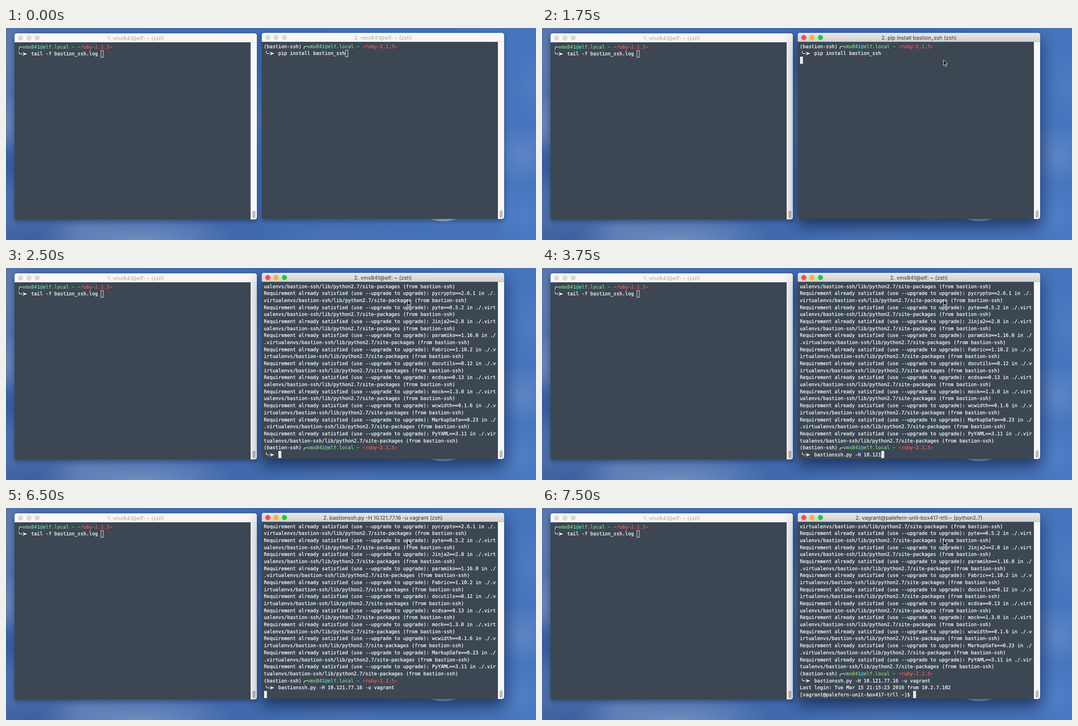
Write an HTML page with a canvas that moves like this. It is 1181 px wide and 474 px high and loops after 8 s.

```html
<!DOCTYPE html>
<html lang="en">
<head>
<meta charset="utf-8">
<title>Two terminals</title>
<style>
html, body { margin: 0; width: 1181px; height: 474px; overflow: hidden; }
body { position: relative; background: #4770b3; text-rendering: geometricPrecision; }
canvas, svg { position: absolute; left: 0; top: 0; }
.row {
  position: absolute; white-space: pre; color: #f6f7f6;
  font: 10.742px/15.68px "DejaVu Sans Mono", monospace;
  -webkit-text-stroke: .32px currentColor;
}
.title {
  position: absolute; width: 540px; text-align: center; white-space: pre;
  font: 11.8px/22px Inter, sans-serif; color: #a9a9a9;
}
.title.on { color: #353535; }
.g { color: #84cc84; }
.c { color: #14d0de; }
.r { color: #ff5a50; }
</style>
</head>
<body>
<canvas id="stage" width="1181" height="474"></canvas>
<div id="text"></div>
<svg width="1181" height="474">
  <path id="pointer" d="M.6 .8V13.4L3.5 10.8L5.6 15.4L7.7 14.5L5.7 10H9.5Z"
    fill="#080808" stroke="#fff" stroke-width="1"/>
</svg>
<script>
const LOOP = 8000, CELL = 6.467, ROW = 15.68, ROWS = 25, COLS = 80;
const ctx = document.getElementById('stage').getContext('2d');
const textLayer = document.getElementById('text');
const pointer = document.getElementById('pointer');

const USER = 'vmx841', HOST = 'elf', REMOTE = 'palefern-unit-box417-trll';
const left = { x: 19, y: 12, tx: 23.8 };
const right = { x: 570, y: 11, tx: 574.5 };

// Terminal content
const who = `<span class="g">${USER}</span><span class="c">@</span>` +
  `<span class="g">${HOST}.local</span> <span class="c">~</span> <span class="r">‹ruby-2.1.5›</span>`;
const head = { html: '(bastion-ssh)  ' + who, hook: 13 };
const entry = cmd => ({ html: '     ' + cmd, arrow: true });
const plain = html => ({ html });

const install = 'pip install bastion_ssh';
const connect = 'bastionssh.py -H 10.121.77.16 -u vagrant';
const packages = ('six==1.10.0 pycrypto==2.6.1 pyte==0.5.2 Jinja2==2.8 paramiko==1.16.0 ' +
  'Fabric==1.10.2 docutils==0.12 ecdsa==0.13 mock==1.3.0 wcwidth==0.1.6 ' +
  'MarkupSafe==0.23 PyYAML==3.11').split(' ');
const output = packages.flatMap(p => {
  const s = `Requirement already satisfied (use --upgrade to upgrade): ${p} in ` +
    './.virtualenvs/bastion-ssh/lib/python2.7/site-packages (from bastion-ssh)';
  return [plain(s.slice(0, COLS)), plain(s.slice(COLS))];
});

const shell = `2. ${USER}@${HOST}: ~ (zsh)`;
const start = [head, entry(install)];
const typed = n => [...output, head, entry(connect.slice(0, n))];
const sent = [...typed(connect.length), plain('')];
const login = [...sent.slice(0, -1), plain('Last login: Tue Mar 15 21:15:23 2016 from 10.2.7.102')];
const prompt = `[vagrant@${REMOTE} ~]$ `;

const steps = [
  { t: 0, title: shell, lines: start, col: 28 },
  { t: 500, title: shell, lines: start, col: 28, mouse: [897, 63] },
  { t: 750, title: shell, lines: start, col: 28 },
  { t: 1750, title: `2. ${install} (zsh)`, lines: [...start, plain('')], col: 0 },
  { t: 2250, title: `2. ${install} (zsh)`, lines: [...output, plain('')], col: 0 },
  { t: 2500, title: shell, lines: typed(0), col: 5 },
  { t: 3750, title: shell, lines: typed(23), col: 28 },
  { t: 4250, title: shell, lines: typed(40), col: 45 },
  { t: 6500, title: `2. ${connect} (zsh)`, lines: sent, col: 0 },
  { t: 7000, title: `2. ${connect} (python2.7)`, lines: sent, col: 0 },
  { t: 7250, title: `2. ${connect} (python2.7)`, lines: [...login, plain('')], col: 0 },
  { t: 7500, title: `2. vagrant@${REMOTE}:~ (python2.7)`, lines: [...login, plain(prompt)], col: prompt.length }
];
const leftLines = [
  { html: '  ' + who, hook: 0 },
  entry('tail -f bastion_ssh.log')
];

// Soft cloud patches: x, y, rx, ry, colour, alpha
const clouds = [
  [0, 60, 60, 150, '120,140,172', .45],
  [0, 210, 45, 70, '135,155,190', .5],
  [0, 310, 50, 60, '36,70,146', .55],
  [50, 474, 110, 55, '48,82,150', .5],
  [300, 474, 220, 60, '140,164,204', .6],
  [180, 455, 90, 35, '120,146,192', .35],
  [520, 460, 90, 60, '62,98,166', .5],
  [565, 200, 30, 120, '100,135,190', .45],
  [760, 474, 180, 40, '88,120,180', .45],
  [1040, 470, 120, 50, '74,112,182', .5],
  [1150, 285, 70, 70, '118,150,204', .5],
  [1181, 130, 60, 90, '96,136,202', .35],
  [1150, 420, 70, 80, '92,136,208', .45]
];

function sky() {
  const g = ctx.createLinearGradient(0, 0, 1181, 0);
  g.addColorStop(0, '#4a6ca8');
  g.addColorStop(.5, '#426cb0');
  g.addColorStop(1, '#4675be');
  ctx.fillStyle = g;
  ctx.fillRect(0, 0, 1181, 474);
  for (const [x, y, rx, ry, rgb, a] of clouds) {
    ctx.save();
    ctx.translate(x, y);
    ctx.scale(rx, ry);
    const blob = ctx.createRadialGradient(0, 0, 0, 0, 0, 1);
    blob.addColorStop(0, `rgba(${rgb},${a})`);
    blob.addColorStop(1, `rgba(${rgb},0)`);
    ctx.fillStyle = blob;
    ctx.fillRect(-1, -1, 2, 2);
    ctx.restore();
  }
  ctx.fillStyle = '#a9bfd9';
  ctx.beginPath();
  ctx.ellipse(975, 407, 48, 25, 0, 0, 7);
  ctx.fill();
}

function roundRect(x, y, w, h, r, fill) {
  ctx.fillStyle = fill;
  ctx.beginPath();
  ctx.roundRect(x, y, w, h, r);
  ctx.fill();
}

function windowFrame({ x, y }, active) {
  ctx.save();
  ctx.shadowColor = active ? 'rgba(0,10,40,.62)' : 'rgba(0,10,40,.38)';
  ctx.shadowBlur = active ? 36 : 12;
  ctx.shadowOffsetY = active ? 14 : 4;
  roundRect(x, y, 540, 416, 5, '#f7f7f7');
  ctx.restore();
  if (active) {
    const bar = ctx.createLinearGradient(0, y, 0, y + 20);
    bar.addColorStop(0, '#e9e9e9');
    bar.addColorStop(1, '#d0d0d0');
    roundRect(x, y, 540, 20, [5, 5, 0, 0], bar);
  }
  // Edges of the title bar and the scroll track
  ctx.fillStyle = active ? '#b4b4b4' : '#dedede';
  ctx.fillRect(x, y + 19.4, 540, .8);
  ctx.fillStyle = '#e9e9e9';
  ctx.fillRect(x + 526, y + 20, 1, 396);
  roundRect(x, y + 20, 526, 396, [0, 0, 0, 4], '#3c4753');
  roundRect(x + 530, y + 396.5, 7, 17, 3.5, '#c1c1c1');
  const fills = active ? ['#fc4b48', '#fdb32f', '#1fc93c'] : Array(3).fill('#dadada');
  const rims = active ? ['#e6423f', '#e8a626', '#1bb832'] : Array(3).fill('#cfcfcf');
  fills.forEach((fill, i) => {
    ctx.beginPath();
    ctx.arc(x + 13.4 + 18.5 * i, y + 10.2, 5.3, 0, 7);
    ctx.fillStyle = fill;
    ctx.fill();
    ctx.strokeStyle = rims[i];
    ctx.lineWidth = .7;
    ctx.stroke();
  });
}

function block(win, row, col, solid) {
  const x = Math.round(win.tx + col * CELL), y = Math.round(win.y + 22 + row * ROW);
  ctx.fillStyle = ctx.strokeStyle = '#ececec';
  ctx.lineWidth = 1;
  if (solid) ctx.fillRect(x, y, 6.5, 16);
  else ctx.strokeRect(x + .5, y + .5, 5.5, 15);
}

function marks(win, row, { hook, arrow }) {
  const c = win.y + 22 + (row + .5) * ROW + .6;
  const x = win.tx + 5.4 + (hook || 0) * CELL;
  const dir = arrow ? -1 : 1;
  ctx.strokeStyle = ctx.fillStyle = '#eef0f0';
  ctx.lineWidth = 1.2;
  ctx.beginPath();
  ctx.moveTo(x, c + 5.5 * dir);
  ctx.lineTo(x, c + 3 * dir);
  ctx.quadraticCurveTo(x, c, x + 3, c);
  ctx.lineTo(x + 7.8, c);
  ctx.stroke();
  if (!arrow) return;
  ctx.beginPath();
  ctx.moveTo(x + 7.6, c - 4);
  ctx.lineTo(x + 18, c);
  ctx.lineTo(x + 7.6, c + 4);
  ctx.lineTo(x + 10.6, c);
  ctx.fill();
}

function terminal(win, title, lines, col, active) {
  windowFrame(win, active);
  const rows = lines.slice(-ROWS);
  rows.forEach((line, i) => {
    if (line.arrow || line.hook !== undefined) marks(win, i, line);
  });
  block(win, rows.length - 1, col, active);
  return `<div class="title${active ? ' on' : ''}" style="left:${win.x}px;top:${win.y}px">${title}</div>` +
    rows.map((line, i) =>
      `<div class="row" style="left:${win.tx}px;top:${win.y + 22.6 + i * ROW}px">${line.html}</div>`).join('');
}

function show(step) {
  const active = step.t >= 750;
  const mouse = step.mouse || (active && [894, 70.5]);
  sky();
  textLayer.innerHTML =
    terminal(left, `1. ${USER}@${HOST}: ~ (zsh)`, leftLines, 29, false) +
    terminal(right, step.title, step.lines, step.col, active);
  pointer.style.display = mouse ? '' : 'none';
  if (mouse) pointer.setAttribute('transform', `translate(${mouse})`);
}

let current;
function tick() {
  const t = performance.now() % LOOP;
  const step = steps.findLast(s => s.t <= t);
  if (step !== current) show(current = step);
  requestAnimationFrame(tick);
}
tick();
</script>
</body>
</html>
```
